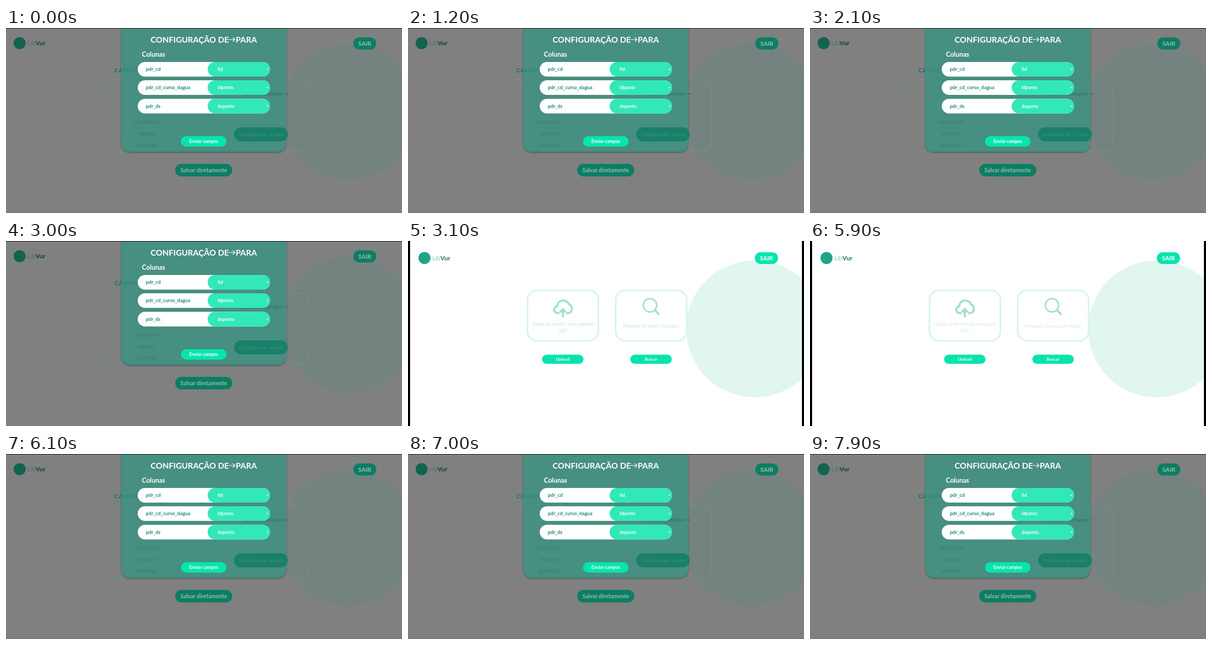
An HTML page for the animation above (8000 ms loop, 756 by 354 pixels).

```html
<!DOCTYPE html>
<html lang="pt-BR">
<head>
<meta charset="utf-8">
<title>Configuração</title>
<style>
  html, body { margin: 0; width: 100%; height: 100%; overflow: hidden; background: #fff; }
  svg { display: block; width: 100vw; height: 100vh; }
  text { font-family: Lato, "Open Sans", sans-serif; font-weight: 700; }
  .blur { filter: blur(.9px); }
</style>
</head>
<body>
<svg id="stage" viewBox="0 0 756 354" xmlns="http://www.w3.org/2000/svg">
  <defs>
    <filter id="shadow" x="-10%" y="-10%" width="120%" height="125%">
      <feDropShadow dx="0" dy="1.5" stdDeviation="1.5" flood-color="#22443c" flood-opacity=".65"/>
    </filter>
  </defs>
  <g id="dialog"></g>
  <g id="home"></g>
</svg>
<script>
const LOOP = 8000;
const HOME_START = 3100, HOME_END = 6100;
const byId = id => document.getElementById(id);

const rect = (x, y, w, h, r, fill, extra = '') =>
  `<rect x="${x}" y="${y}" width="${w}" height="${h}" rx="${r}" fill="${fill}" ${extra}/>`;
const circle = (x, y, r, fill) => `<circle cx="${x}" cy="${y}" r="${r}" fill="${fill}"/>`;
const label = (x, y, size, fill, str, extra = '') =>
  `<text x="${x}" y="${y}" font-size="${size}" fill="${fill}" ${extra}>${str}</text>`;
const centered = 'text-anchor="middle"';

const button = (x, y, w, h, size, fill, ink, str) =>
  rect(x, y, w, h, h / 2, fill) +
  label(x + w / 2, y + h / 2 + size * .35, size, ink, str, centered);

const brand = (x, y, mark, light, bold) =>
  circle(x, y, 11.5, mark) +
  `<text x="${x + 15}" y="${y + 4}" font-size="12"><tspan fill="${light}" font-weight="300">Lib</tspan><tspan fill="${bold}">Vur</tspan></text>`;

const fieldRow = (y, column, value) =>
  rect(251.5, y, 252.5, 28, 14, '#fff') +
  rect(385, y, 119, 28, 14, '#32e8b8') +
  label(267, y + 17, 9.4, '#1d8a74', column) +
  label(404, y + 17, 8.6, '#f2fffb', value) +
  `<path d="M497 ${y + 13}h4l-2 2.4z" fill="#d9fff4"/>`;

function dialogScene() {
  const dimButton = '#0c7e63', dimInk = '#9eb7af';
  const page =
    rect(0, 0, 756, 354, 0, '#808080') +
    circle(655, 160, 130, '#74837f') +
    brand(26, 29, '#12644f', '#285f55', '#0c4239') +
    button(663, 18, 44, 23, 11.5, dimButton, dimInk, 'SAIR') +
    label(207, 85, 12, '#0b7a60', 'CAMPOS') +
    rect(177, 99.5, 402, 137, 16, 'none', 'stroke="#748a84" stroke-width="2.5"') +
    button(323, 260, 109, 24, 10.7, dimButton, dimInk, 'Salvar diretamente') +
    circle(210, 250, .6, '#ddd');
  const panel =
    rect(220, -16, 315, 253, 17, '#468f80', 'filter="url(#shadow)"') +
    label(221, 85, 12, '#2f8370', 'AMPOS', 'opacity=".6"') +
    `<path d="M220 99.5H535M220 236H535" stroke="#438878" opacity=".5"/>` +
    `<path d="M394 160v70" stroke="#3f8979" opacity=".5"/>`;
  const behind =
    `<g id="faint" class="blur" fill="#2f7d6c">` +
      label(269, 183, 9, '#2d7c6a', 'executando', centered) +
      label(269, 205, 9, '#2d7c6a', 'arquivos', centered) +
      label(269, 227, 9, '#2d7c6a', 'download', centered) +
    `</g>` +
    label(530, 129, 9, '#2b6f61', 'Tipo de modelagem', 'text-anchor="end" opacity=".65"') +
    `<path d="M534.5 125l2.2 2.4 2.2-2.4" fill="none" stroke="#23564c"/>` +
    rect(435.5, 190, 102.5, 27, 13.5, '#198069') +
    label(487, 207, 8.8, '#3f8978', 'Configurar de → para', centered);
  const form =
    label(276, 28, 15.6, '#fff', 'CONFIGURAÇÃO DE') +
    `<path d="M424.5 22H437M433 18l4 4-4 4" fill="none" stroke="#fff" stroke-width="1.2"/>` +
    label(438.5, 28, 15.6, '#fff', 'PARA') +
    label(259.5, 55, 12.5, '#fff', 'Colunas') +
    fieldRow(65, 'pdr_cd', 'fid') +
    fieldRow(100, 'pdr_cd_curso_dagua', 'Idponto') +
    fieldRow(135.5, 'pdr_ds', 'deponto') +
    button(334, 207, 87, 20, 8.6, '#06e5ae', '#fff', 'Enviar campos');
  const edges =
    rect(0, 0, 756, 1, 0, '#181818') +
    rect(0, 353, 756, 1, 0, '#756f70');
  return page + panel + behind + form + edges;
}

function homeScene() {
  const green = '#08e3ae', icon = '#a3dfd2', hint = '#cbebe3';
  const card = x => rect(x, 94.5, 135.5, 96.5, 18, '#fff',
    'stroke="#d8f4ed" stroke-width="3.2"');
  const cloud =
    `<path d="M289 138h-3a6.5 6.5 0 0 1-1-13c0-13 18-15 22-4 8 2 8 16-1 17h-4" fill="none" stroke="${icon}" stroke-width="4"/>` +
    `<path d="M295.7 146v-14M290 136.5l5.7-6 5.7 6" fill="none" stroke="${icon}" stroke-width="4"/>`;
  const lens =
    `<circle cx="462" cy="123" r="12.7" fill="none" stroke="${icon}" stroke-width="3"/>` +
    `<path d="M471 132l7.5 7.5" stroke="${icon}" stroke-width="4" stroke-linecap="round"/>`;
  return rect(0, 0, 756, 354, 0, '#fff') +
    circle(662, 168, 131, '#e1f6f0') +
    brand(31.5, 32.5, '#22a388', '#4a9286', '#1d7263') +
    button(662, 21.5, 44.5, 22.5, 11.5, green, '#fff', 'SAIR') +
    card(228) + card(396.5) + cloud + lens +
    `<g id="hints" class="blur">` +
      label(296, 161.5, 8.6, hint, 'Clique ou arraste seus arquivos', centered) +
      label(295, 173.5, 8.6, hint, 'aqui', centered) +
      label(464, 165.5, 8.6, hint, 'Pesquise no banco de dados', centered) +
    `</g>` +
    button(256, 217.5, 79, 17.5, 8.4, green, '#f0fffa', 'Upload') +
    button(424.5, 217.5, 79, 17.5, 8.2, green, '#f0fffa', 'Buscar') +
    rect(0, 0, 4, 354, 0, '#000') +
    rect(752, 0, 4, 354, 0, '#000');
}

byId('dialog').innerHTML = dialogScene();
byId('home').innerHTML = homeScene();

function render(t) {
  const atHome = t >= HOME_START && t < HOME_END;
  byId('dialog').style.display = atHome ? 'none' : '';
  byId('home').style.display = atHome ? '' : 'none';
  byId('faint').style.opacity = t < 1000 ? .75 : .6;
  byId('hints').style.opacity = t < 5200 ? 1 : .85;
}

function tick(now) {
  render(now % LOOP);
  requestAnimationFrame(tick);
}
render(0);
requestAnimationFrame(tick);
</script>
</body>
</html>
```
